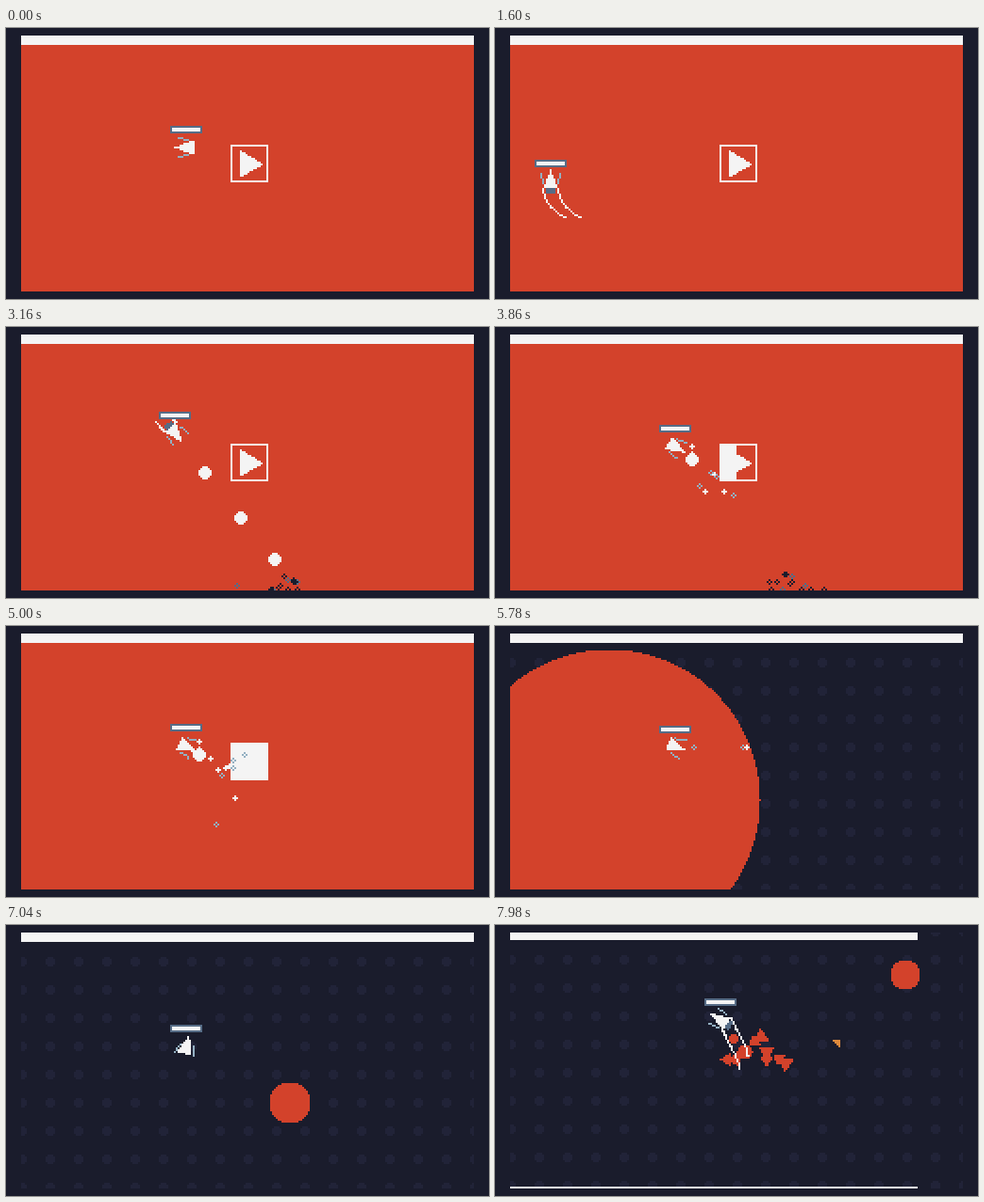
Animation, 512 px wide and 288 px high, one loop 8 s. Source, as an HTML page with a canvas:

```html
<!DOCTYPE html>
<html lang="en">
<head>
<meta charset="utf-8">
<title>Pixel ship</title>
<style>
html, body { margin: 0; width: 100%; height: 100%; overflow: hidden; background: #1a1c2c; }
canvas { display: block; width: 512px; height: 288px; image-rendering: pixelated; }
</style>
</head>
<body>
<canvas id="stage" width="256" height="144"></canvas>
<script>
const g = document.getElementById('stage').getContext('2d');
const LOOP = 8000, SWITCH = 5320, HIT = 7780;
const INK = '#1a1c2c', DOT = '#212338', RED = '#d3422b', WHITE = '#f4f4f4',
      STEEL = '#566c86', ICE = '#94b0c2', ORANGE = '#e08a3c';

// Time, x, y
const PATH = [
  [400, 191, 129], [800, 168, 168], [1200, 112, 196], [1400, 83, 195], [1600, 59, 165],
  [2040, 58, 72], [2284, 87, 52], [2540, 139, 75], [2860, 166, 100], [3660, 191, 129],
  [7040, 191, 131], [7450, 232, 182], [7780, 257, 146], [7980, 239, 105]
];
// Time, heading in degrees
const TURN = [
  [400, 180], [1600, 270], [2284, 411], [3400, 411], [3860, 391],
  [5780, 381], [7040, 285], [7980, 213]
];
// Final x, y and heading of the chasers
const DARTS = [[250, 145, 180], [278, 124, 145], [288, 142, 90], [304, 146, 215]];
const ORBS = [[252, 123, 5], [264, 137, 8]];

const clamp = u => Math.max(0, Math.min(1, u));
const rand = n => { const s = Math.sin(n * 127.1 + 11.7) * 43758.5453; return s - Math.floor(s); };

// Monotone cubic through the keys
function at(keys, t, c) {
  const n = keys.length - 1;
  if (t <= keys[0][0]) return keys[0][c];
  if (t >= keys[n][0]) return keys[n][c];
  let i = 0;
  while (keys[i + 1][0] < t) i++;
  const slope = k => (keys[k + 1][c] - keys[k][c]) / (keys[k + 1][0] - keys[k][0]);
  const tangent = k => {
    if (k === 0) return slope(0);
    if (k === n) return slope(n - 1);
    const a = slope(k - 1), b = slope(k);
    return a * b <= 0 ? 0 : 2 * a * b / (a + b);
  };
  const h = keys[i + 1][0] - keys[i][0], u = (t - keys[i][0]) / h, v = 1 - u;
  return keys[i][c] * v * v * (1 + 2 * u) + keys[i + 1][c] * u * u * (3 - 2 * u)
    + h * u * v * (tangent(i) * v - tangent(i + 1) * u);
}
const shipAt = t => [at(PATH, t, 1), at(PATH, t, 2)];

// The red ball drifts right on an arc while shrinking
function ball(t) {
  const u = t - 5780;
  return [120 + .1432 * u, 184 + .0879 * u - 6.66e-5 * u * u, 15 + 145 * Math.exp(-u / 410)];
}

// Drawing helpers take stage units; each dot is two units wide
function rect(x, y, w, h, color) {
  g.fillStyle = color;
  g.fillRect(Math.round(x / 2), Math.round(y / 2), Math.round(w / 2), Math.round(h / 2));
}

function disc(x, y, r, color) {
  x = Math.floor(Math.round(x - .5) / 2) + .5;
  y = Math.floor(Math.round(y - .5) / 2) + .5;
  r /= 2;
  g.fillStyle = color;
  for (let j = Math.max(0, Math.floor(y - r)); j < Math.min(146, y + r); j++) {
    const d = r * r - (j + .5 - y) ** 2;
    if (d <= 0) continue;
    const w = Math.sqrt(d), a = Math.ceil(x - w - .5), b = Math.floor(x + w - .5);
    g.fillRect(a, j, b - a + 1, 1);
  }
}

function line(p, q, color) {
  const x0 = p[0] / 2, y0 = p[1] / 2, dx = q[0] / 2 - x0, dy = q[1] / 2 - y0;
  const n = Math.max(1, Math.ceil(Math.max(Math.abs(dx), Math.abs(dy))));
  g.fillStyle = color;
  for (let i = 0; i <= n; i++) g.fillRect(Math.floor(x0 + dx * i / n), Math.floor(y0 + dy * i / n), 1, 1);
}

function poly(points, color) {
  const p = points.map(q => [q[0] / 2, q[1] / 2]), ys = p.map(q => q[1]);
  g.fillStyle = color;
  for (let j = Math.floor(Math.min(...ys)); j <= Math.max(...ys); j++) {
    const xs = [];
    p.forEach((a, i) => {
      const b = p[(i + 1) % p.length], y = j + .5;
      if ((a[1] <= y) !== (b[1] <= y)) xs.push(a[0] + (y - a[1]) / (b[1] - a[1]) * (b[0] - a[0]));
    });
    xs.sort((a, b) => a - b);
    for (let k = 0; k + 1 < xs.length; k += 2) {
      const a = Math.round(xs[k]);
      g.fillRect(a, j, Math.round(xs[k + 1]) - a, 1);
    }
  }
}

function plus(x, y, color) {
  const i = Math.floor(x / 2), j = Math.floor(y / 2);
  g.fillStyle = color;
  for (const d of [-1, 1]) {
    g.fillRect(i + d, j, 1, 1);
    g.fillRect(i, j + d, 1, 1);
  }
  if (color === WHITE) g.fillRect(i, j, 1, 1);
}

// Maps (ahead, sideways) around a centre with a heading
function frame(x, y, deg) {
  const c = Math.cos(deg * Math.PI / 180), s = Math.sin(deg * Math.PI / 180);
  return (f, n) => [x + f * c - n * s, y + f * s + n * c];
}

function backdrop() {
  rect(16, 0, 480, 290, INK);
  for (let y = 9; y < 290; y += 30)
    for (let x = 17; x < 500; x += 30) disc(x, y, 5, DOT);
}

function button(t) {
  rect(238, 124, 40, 40, WHITE);
  rect(240, 126, 36, 36, RED);
  rect(240, 126, 36 * clamp((t - 3560) / 675), 36, WHITE);
  poly([[248, 129.5], [272.5, 145], [248, 159]], WHITE);
}

function burst(x, y, age, seed, colors) {
  for (let k = 0; k < 4; k++) {
    const r = seed * 7 + k * 3;
    if (age > 200 + 300 * rand(r)) continue;
    const vx = (rand(r + 1) - .5) * .2, vy = -.03 - .14 * rand(r + 2);
    plus(x + vx * age, Math.min(278, y + vy * age + .0005 * age * age), colors[k % colors.length]);
  }
}

function shots(t) {
  for (let n = -2; n < 20; n++) {
    const born = 2540 + 128 * n, age = t - born;
    if (age < 0 || age > 1300) continue;
    const [x, y] = shipAt(born), muzzle = frame(x, y + 1, at(TURN, born, 1));
    const [vx, vy] = frame(0, 0, at(TURN, born, 1))(.53, 0);
    let end = (232 - x) / vx;
    const struck = y + vy * end < 171;
    if (!struck) end = (272 - y) / vy;
    if (age < end) {
      const [bx, by] = muzzle(.53 * age + 1, 0);
      disc(bx, by, 7, WHITE);
      if (born > 3500 && age < 60) {
        rect(bx - 1, by - 9, 2, 4, WHITE);
        plus(bx, by - 14, WHITE);
      }
    } else {
      burst(x + vx * end + 3, y + vy * end, age - end, n + 9,
        struck ? [WHITE, ICE] : [INK, INK, STEEL]);
    }
  }
}

function lastSparks(t) {
  if (t < 5500 || t > 6000) return;
  const x = 262 + (t - 5780) * .03;
  plus(211, 129, ICE);
  plus(x, 129, ICE);
  plus(x + 5, 129, WHITE);
}

// Chasers leave the ball one by one and swing towards the ship
function chase(t, i, x, y) {
  const born = 7120 + 80 * i, u = (t - born) / (7980 - born);
  if (u < 0) return null;
  const p = 1 - (1 - clamp(u)) ** 1.6, [sx, sy] = ball(born);
  return [sx + (x - sx) * p, sy + (y - sy) * p + Math.sin(Math.PI * p) * (18 + 4 * i), 1 - u];
}

function foes(t) {
  DARTS.forEach(([x, y, deg], i) => {
    const c = chase(t, i, x, y);
    if (!c) return;
    const p = frame(c[0], c[1], deg + c[2] * 70);
    poly([p(12, 0), p(0, 7), p(0, 3), p(-10, 8), p(-10, -8), p(0, -3), p(0, -7)], RED);
  });
  ORBS.forEach(([x, y, r], i) => {
    const c = chase(t, i + 1, x, y);
    if (c) disc(c[0], c[1], r, RED);
  });
  if (t > 7860) poly([[358, 125], [366, 125], [366, 133]], ORANGE);
}

function ship(t) {
  const [x, y] = shipAt(t), old = shipAt(t - 200), deg = at(TURN, t, 1);
  const p = frame(x, y - 2, deg);
  const fold = clamp((t - 6140) / 460) * clamp((7300 - t) / 200);
  if (Math.hypot(x - old[0], y - old[1]) > 12) {
    for (const side of [-8, 8])
      for (let lag = 0; lag < 200; lag += 20) {
        const [a, b] = [lag, lag + 20].map(l => {
          const [px, py] = shipAt(t - l);
          return frame(px, py - 2, deg)(-8, side);
        });
        line(a, b, WHITE);
      }
    poly([p(-8, 5), p(-8, -5), p(-13, -5), p(-13, 5)], STEEL);
  }
  for (const s of [-1, 1])
    line(p(8 - 7 * fold, s * (10 - 3 * fold)), p(-2 - 6 * fold, s * (8 + 2 * fold)), ICE);
  poly([p(13, 0), p(-8, 8), p(-8, -8)], WHITE);
  const left = 2 * Math.round((x - 17) / 2), top = 2 * Math.round((y - 25) / 2);
  rect(left, top, 34, 8, STEEL);
  rect(left + 2, top + 2, 30, 4, WHITE);
}

function draw(t) {
  g.fillStyle = INK;
  g.fillRect(0, 0, 256, 144);
  g.save();
  g.beginPath();
  g.rect(8, 4, 240, 136);
  g.clip();
  if (t >= HIT) g.translate(0, Math.floor((t - HIT) / 50) % 2 ? 1 : -1);
  if (t < SWITCH) {
    rect(16, 0, 480, 290, RED);
    button(t);
  } else {
    backdrop();
    disc(...ball(t), RED);
  }
  foes(t);
  ship(t);
  shots(t);
  lastSparks(t);
  const bar = 480 - 48 * clamp((t - HIT) / 120);
  rect(16, 8, bar, 10, WHITE);
  rect(16, 280, bar, 10, WHITE);
  g.restore();
}

const start = performance.now();
function tick() {
  const t = (performance.now() - start) % LOOP;
  draw(Math.floor(t / 20) * 20);
  requestAnimationFrame(tick);
}
tick();
</script>
</body>
</html>
```
